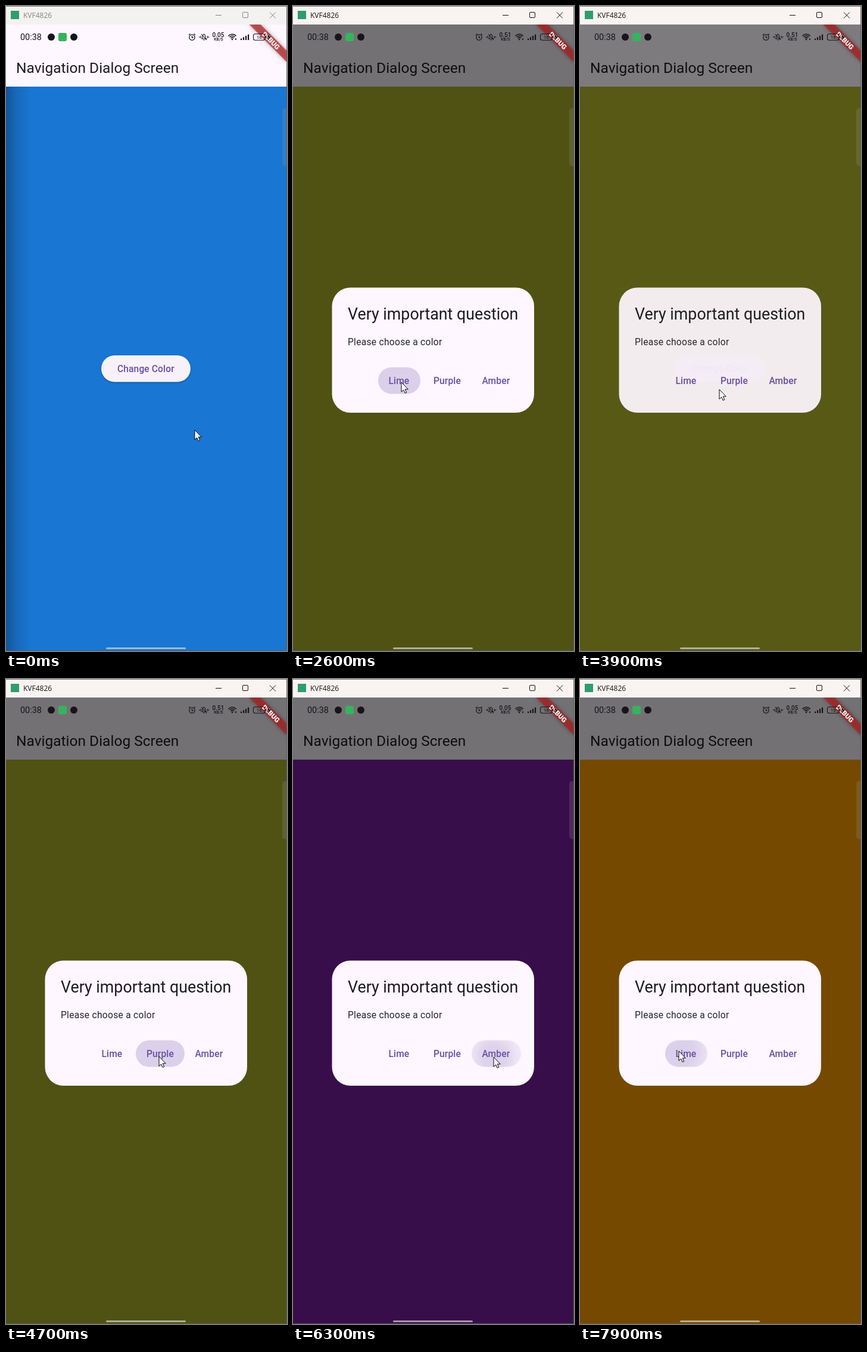
These frames come from a looping animation (472x1080 px, 8 s). An HTML page with a canvas:

```html
<!DOCTYPE html>
<html lang="en">
<head>
<meta charset="utf-8">
<title>Navigation dialog</title>
<style>
html, body { margin: 0; width: 100%; height: 100%; overflow: hidden; }
canvas { display: block; width: 472px; height: 1080px; }
</style>
</head>
<body>
<canvas id="stage" width="472" height="1080"></canvas>
<script>
const W = 472, H = 1080, LOOP = 8000, STEP = 100, FADE = 150;
const SURFACE = '#fef7ff', INK = '#1d1b20', PRIMARY = '103,80,164';
const screen = document.getElementById('stage').getContext('2d');
const layerCanvas = document.createElement('canvas');
layerCanvas.width = W;
layerCanvas.height = H;
const layer = layerCanvas.getContext('2d');
let g = screen;

const BUTTON = { label: 'Change Color', tx: 187, x: 160, y: 585, w: 150, h: 44.5 };
const CHOICES = [
  { label: 'Lime', tx: 160.5, x: 143, y: 605, w: 71, h: 44.5, color: '#afb42b' },
  { label: 'Purple', tx: 236, x: 218, y: 605, w: 82, h: 44.5, color: '#7b1fa2' },
  { label: 'Amber', tx: 317.5, x: 300, y: 605, w: 83, h: 44.5, color: '#ffa000' }
];

// One entry per dialog visit: tap on the button, opening, tap on a choice, closing.
const VISITS = [
  { tap: 800, open: 950, pick: 2320, close: 2600, choice: 0 },
  { tap: 3640, open: 3789, pick: 4560, close: 4800, choice: 1 },
  { tap: 5480, open: 5610, pick: 6220, close: 6465, choice: 2 },
  { tap: 7080, open: 7210, pick: 7810, close: 8100, choice: 0 }
];

// Cursor stops: time, x, y
const PATH = [
  [0, 317, 710], [200, 317, 710], [700, 252, 612], [950, 252, 612],
  [1400, 353, 737], [1650, 350, 735], [2250, 182, 630], [2650, 182, 630],
  [3350, 234, 612], [3750, 234, 616], [3900, 234, 642], [4400, 257, 632],
  [4800, 257, 632], [5350, 261, 624], [5650, 261, 624], [6150, 338, 632],
  [6450, 336, 634], [6600, 324, 691], [7000, 262, 612], [7250, 262, 612],
  [7750, 166, 623], [8000, 166, 623]
];

const clamp = v => Math.max(0, Math.min(1, v));
const easeOut = v => 1 - (1 - v) ** 2;
const smooth = v => v * v * (3 - 2 * v);

function cursorAt(t) {
  const i = Math.max(1, PATH.findIndex(p => p[0] >= t));
  const [t0, x0, y0] = PATH[i - 1], [t1, x1, y1] = PATH[i];
  const k = smooth((t - t0) / (t1 - t0));
  return [x0 + (x1 - x0) * k, y0 + (y1 - y0) * k];
}

function rect(x, y, w, h, color) {
  g.fillStyle = color;
  g.fillRect(x, y, w, h);
}

function round(x, y, w, h, r, color) {
  g.beginPath();
  g.roundRect(x, y, w, h, r);
  g.fillStyle = color;
  g.fill();
}

function dot(x, y, r, color) {
  g.beginPath();
  g.arc(x, y, r, 0, Math.PI * 2);
  g.fillStyle = color;
  g.fill();
}

function arc(x, y, r, from, to) {
  g.beginPath();
  g.arc(x, y, r, from, to);
  g.stroke();
}

function line(...p) {
  g.beginPath();
  for (let i = 0; i < p.length; i += 2) g.lineTo(p[i], p[i + 1]);
  g.stroke();
}

function text(s, x, y, font, color, spacing = 0, align = 'left') {
  g.font = font;
  g.letterSpacing = spacing + 'px';
  g.textAlign = align;
  g.fillStyle = color;
  g.fillText(s, x, y);
}

function label(b) {
  text(b.label, b.tx, b.y + 27.9, '500 15.6px Roboto, sans-serif', `rgb(${PRIMARY})`, 0.11);
}

// Press tint plus a soft ripple that spreads from the pointer.
function ink(b, age, point) {
  if (age <= 0) return;
  round(b.x, b.y, b.w, b.h, b.h / 2, `rgba(${PRIMARY},${0.09 * clamp(age / 90)})`);
  const spread = clamp((age - 60) / 140);
  if (!spread) return;
  const r = 20 + 150 * spread;
  const glow = g.createRadialGradient(point[0], point[1], 0, point[0], point[1], r);
  glow.addColorStop(0, `rgba(${PRIMARY},.16)`);
  glow.addColorStop(0.4 + 0.5 * spread, `rgba(${PRIMARY},.15)`);
  glow.addColorStop(1, `rgba(${PRIMARY},.02)`);
  round(b.x, b.y, b.w, b.h, b.h / 2, glow);
}

function drawPage(t, color) {
  rect(0, 30, W, 106, SURFACE);
  rect(0, 135, W, H - 135, color);
  text('Navigation Dialog Screen', 17, 112, '24.5px Roboto, sans-serif', INK);
  if (t < 300) {
    const shade = g.createLinearGradient(0, 0, 42, 0);
    const a = 0.28 * (1 - t / 300);
    shade.addColorStop(0, `rgba(0,0,0,${a})`);
    shade.addColorStop(0.4, `rgba(0,0,0,${a * 0.4})`);
    shade.addColorStop(1, 'rgba(0,0,0,0)');
    rect(0, 135, 42, H - 135, shade);
  }
  g.save();
  g.shadowColor = 'rgba(0,0,0,.3)';
  g.shadowBlur = 3;
  g.shadowOffsetY = 1;
  round(BUTTON.x, BUTTON.y, BUTTON.w, BUTTON.h, BUTTON.h / 2, '#f7f2fa');
  g.restore();
  const visit = VISITS.find(v => t > v.tap && t < v.open + 250);
  if (visit) ink(BUTTON, t - visit.tap, cursorAt(visit.tap));
  label(BUTTON);
}

function drawDialog(t, visit, opacity) {
  rect(0, 30, W, H - 30, `rgba(0,0,0,${0.54 * opacity})`);
  g = layer;
  g.clearRect(0, 0, W, H);
  round(65.5, 471.5, 339.5, 209.5, 31, SURFACE);
  text('Very important question', 92, 525, '26.8px Roboto, sans-serif', INK);
  text('Please choose a color', 92, 568, '15.6px Roboto, sans-serif', '#25222a', 0.28);
  ink(CHOICES[visit.choice], t - visit.pick, cursorAt(visit.pick));
  CHOICES.forEach(label);
  g = screen;
  g.globalAlpha = opacity;
  g.drawImage(layerCanvas, 0, 0);
  g.globalAlpha = 1;
}

function drawBanner() {
  g.save();
  g.beginPath();
  g.rect(0, 31, W, H);
  g.clip();
  g.translate(W, 31);
  g.rotate(Math.PI / 4);
  g.shadowColor = 'rgba(0,0,0,.5)';
  g.shadowBlur = 7;
  rect(-44.7, 31.3, 89.4, 13.4, 'rgba(183,28,28,.68)');
  g.shadowColor = 'transparent';
  text('DEBUG', 0, 42.1, '900 11.4px Roboto, sans-serif', '#fff', 0, 'center');
  g.restore();
}

function drawStatus(t) {
  const ui = '#17151a';
  text('00:38', 24, 56.8, '14.4px Roboto, sans-serif', ui);
  dot(76, 52, 6, ui);
  round(88, 45, 14, 14, 3, '#35b35d');
  dot(114, 52, 6, ui);

  g.strokeStyle = ui;
  g.lineWidth = 1.3;
  arc(312.5, 52.5, 4.6, 0, Math.PI * 2);
  line(312.5, 50, 312.5, 53, 314.5, 53);
  line(307, 48.5, 309.5, 46.5);
  line(318, 48.5, 315.5, 46.5);

  g.lineWidth = 1.1;
  line(328.5, 55, 330, 53, 330, 50, 332.5, 47, 335, 50, 335, 53, 336.5, 55, 328.5, 55);
  line(328, 47, 337, 57);
  line(331.5, 57, 333.5, 57);
  for (const [x, r] of [[327, 2], [325, 1], [338.5, 2], [340.5, 1]]) line(x, 52 - r, x, 52 + r);

  const rate = t >= 800 && t < 4800 ? '0.51' : '0.05';
  text(rate, 356.5, 52, '500 10px Roboto, sans-serif', ui, 0, 'center');
  text('KB/S', 357, 58, '500 6.8px Roboto, sans-serif', ui, 0, 'center');

  g.lineWidth = 1.5;
  for (const r of [3.2, 6, 8.8]) arc(380, 56, r, -Math.PI * 0.77, -Math.PI * 0.23);
  dot(380, 56, 1.3, ui);
  dot(386, 55.5, 1.2, ui);
  for (let i = 0; i < 4; i++) rect(394 + i * 4, 54.5 - i * 2.3, 2.2, 2.5 + i * 2.3, ui);

  g.lineWidth = 1.1;
  g.beginPath();
  g.roundRect(415.5, 46.8, 19.5, 10.4, 3);
  g.stroke();
  text('16', 425.3, 55, '8px Roboto, sans-serif', ui, 0, 'center');
  rect(436, 50, 1.3, 4, ui);
  g.beginPath();
  for (const [x, y] of [[442, 46.5], [438.5, 52.5], [441, 52.5], [440, 57.5], [445, 50.8], [442, 50.8]]) g.lineTo(x, y);
  g.fillStyle = ui;
  g.fill();
}

function drawWindow(active) {
  const tone = active ? '#111' : '#858383';
  rect(0, 0, W, 31, active ? '#f9f3f2' : '#f4f2f1');
  rect(8, 8, 14, 14, '#2f9e6c');
  text('KVF4826', 29, 19.5, '12px "Open Sans", sans-serif', active ? '#151515' : '#858383');
  g.strokeStyle = tone;
  g.lineWidth = 1;
  line(352, 15.5, 362, 15.5);
  g.beginPath();
  g.roundRect(397.5, 10.5, 9, 9, 1.5);
  g.stroke();
  line(443, 10.5, 453, 20.5);
  line(453, 10.5, 443, 20.5);
}

function drawEdges() {
  round(464, 171, 12, 97, 5, 'rgba(150,150,150,.22)');
  round(168, 1074, 134, 3, 1.5, 'rgba(235,235,235,.6)');
  const edge = 'rgba(95,95,95,.85)';
  rect(0, 0, W, 1, edge);
  rect(W - 1, 1, 1, H - 1, edge);
  rect(0, H - 1, W - 1, 1, edge);
}

function drawCursor([x, y]) {
  const shape = [[0, 0], [0, 16.2], [3.7, 12.8], [6.2, 18.3], [8.7, 17.2], [6.3, 11.8], [11.3, 11.8]];
  g.beginPath();
  for (const [dx, dy] of shape) g.lineTo(x + dx, y + dy);
  g.closePath();
  g.fillStyle = '#fff';
  g.fill();
  g.strokeStyle = '#000';
  g.lineWidth = 1;
  g.stroke();
}

function draw(t) {
  let color = '#1976d2';
  for (const v of VISITS) if (t >= v.close - 40) color = CHOICES[v.choice].color;
  drawPage(t, color);
  const visit = VISITS.find(v => t > v.open && t < v.close + FADE);
  if (visit) {
    const shown = Math.min(clamp((t - visit.open) / FADE), clamp(1 - (t - visit.close) / FADE));
    drawDialog(t, visit, easeOut(shown));
  }
  drawBanner();
  drawStatus(t);
  drawWindow(t >= VISITS[0].tap);
  drawEdges();
  drawCursor(cursorAt(t));
}

function tick() {
  draw(Math.floor(performance.now() % LOOP / STEP) * STEP);
  requestAnimationFrame(tick);
}
tick();
</script>
</body>
</html>
```
